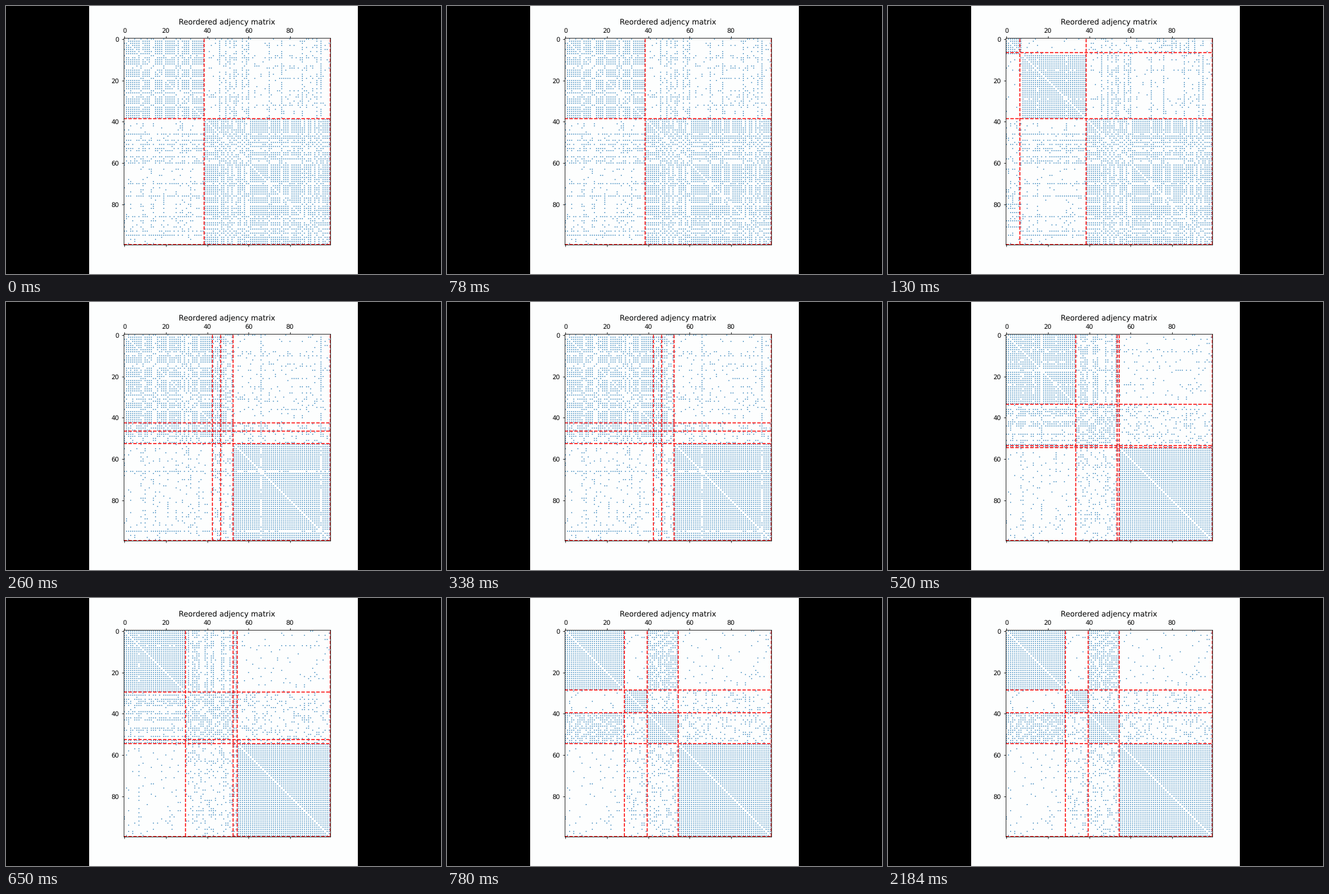
These frames come from a looping animation (680 by 420 pixels, 3.12 s). A matplotlib script:

```python
import numpy as np
import matplotlib.pyplot as plt
from matplotlib.animation import ArtistAnimation
from matplotlib.collections import PolyCollection
from matplotlib.patches import Rectangle

W, H, DPI = 680, 420, 70
STEP_MS, FRAMES = 130, 24
PAPER = "#fdfefe"
DOT = 0.42  # side of a dot in cells

# Stochastic block model with four communities
SIZES = dict(A=29, B=11, C=15, D=45)
DENSITY = np.array([
    [1.00, 0.08, 0.70, 0.05],
    [0.08, 1.00, 0.30, 0.18],
    [0.70, 0.30, 1.00, 0.25],
    [0.05, 0.18, 0.25, 1.00],
])

# Clusters found at each step, by how many nodes of each community they hold
STEPS = [
    [dict(A=29, B=8, C=2), dict(B=3, C=13, D=45)],
    [dict(B=7), dict(A=29, B=1, C=2), dict(B=3, C=13, D=45)],
    [dict(A=29, B=9, C=5), dict(C=4), dict(B=2, C=4), dict(C=2, D=45)],
    [dict(A=29, B=6, C=5), dict(B=3, C=7), dict(B=2, C=3), dict(D=45)],
    [dict(A=29, B=1, C=4), dict(B=10, C=10), dict(C=1), dict(D=45)],
    [dict(A=29, C=1), dict(B=11, C=12), dict(C=2), dict(D=45)],
    [dict(A=29), dict(B=11), dict(C=15), dict(D=45)],
]

rng = np.random.default_rng(4)
N = sum(SIZES.values())
kinds = np.repeat(np.arange(4), list(SIZES.values()))
upper = np.triu(rng.random((N, N)) < DENSITY[np.ix_(kinds, kinds)], 1)
graph = upper | upper.T
rank = rng.permutation(N)


def node_order(clusters):
    """Take nodes of each community in turn; sort every cluster by node rank."""
    pools = {k: iter(np.flatnonzero(kinds == i)) for i, k in enumerate(SIZES)}
    order = []
    for cluster in clusters:
        nodes = [next(pools[k]) for k, n in cluster.items() for _ in range(n)]
        order += sorted(nodes, key=lambda node: rank[node])
    return order


def make_dots(matrix):
    rows, cols = np.nonzero(matrix)
    corners = np.array([(-1, -1), (1, -1), (1, 1), (-1, 1)]) * DOT / 2
    centers = np.column_stack([cols, rows])
    dots = PolyCollection(centers[:, None] + corners, fc="C0", lw=0)
    dots.set_snap(False)
    return ax.add_collection(dots, autolim=False)


def make_step(clusters):
    order = node_order(clusters)
    artists = [make_dots(graph[np.ix_(order, order)])]
    for edge in np.cumsum([sum(c.values()) for c in clusters]) - 0.5:
        for line in (ax.axhline, ax.axvline):
            artists.append(line(edge, color="red", ls="--", lw=1.5, snap=False))
    return artists


plt.rcParams["text.hinting"] = "none"
fig = plt.figure(figsize=(W / DPI, H / DPI), dpi=DPI, facecolor="black")
fig.add_artist(Rectangle((130 / W, 0), 420 / W, 1, fc=PAPER, lw=0, zorder=-1))
ax = fig.add_axes([183.55 / W, 0.11, 323.4 / W, 0.77], facecolor=PAPER)
ax.set(xlim=(-0.5, N - 0.5), ylim=(N - 0.5, -0.5),
       xticks=range(0, N, 20), yticks=range(0, N, 20))
ax.xaxis.tick_top()
ax.xaxis.set_ticks_position("both")
ax.set_title("Reordered adjency matrix")

steps = [make_step(clusters) for clusters in STEPS]
frames = [steps[min(i, len(steps) - 1)] for i in range(FRAMES)]
anim = ArtistAnimation(fig, frames, interval=STEP_MS, repeat=True, repeat_delay=0)
plt.show()
```
